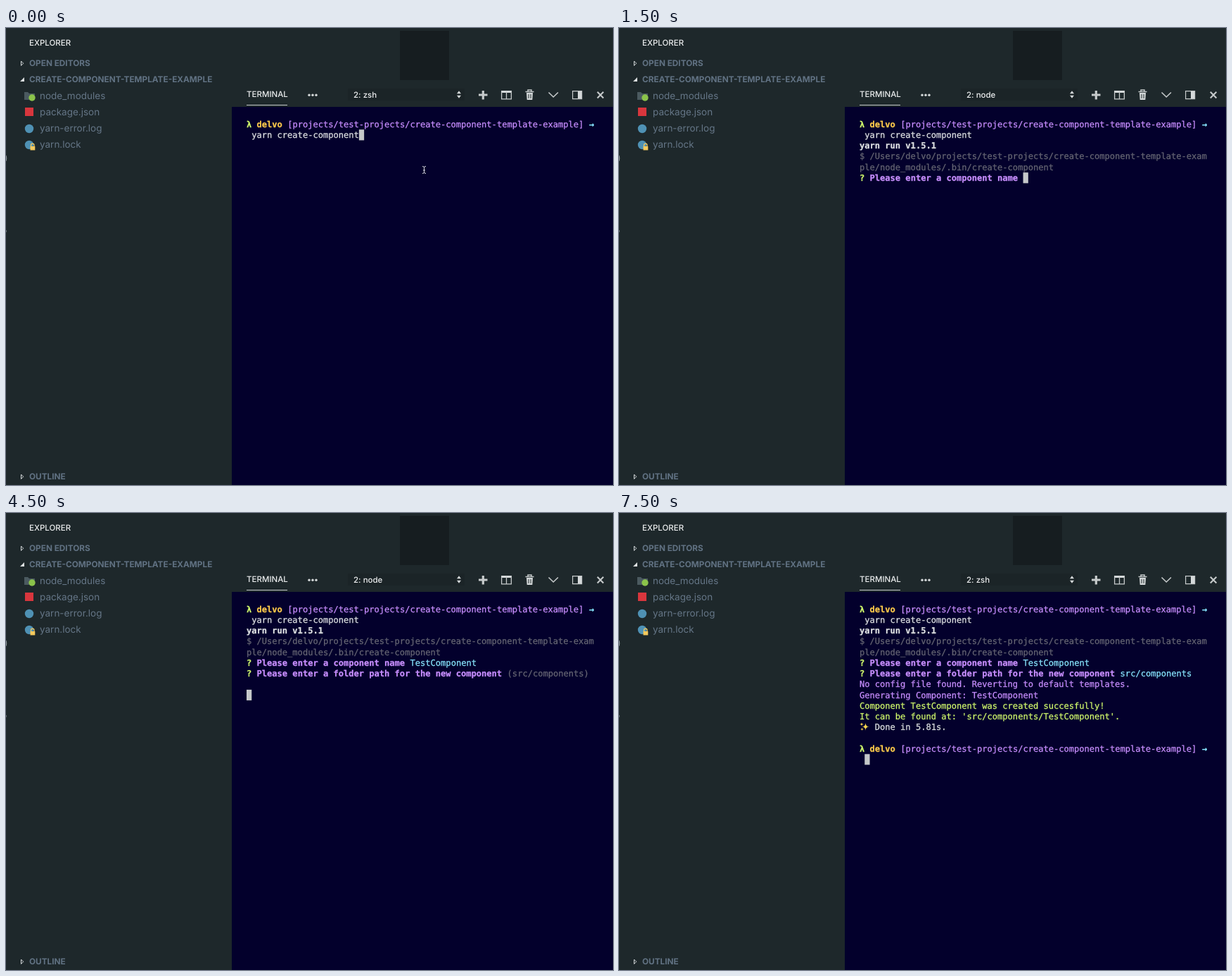
An HTML page for the animation above (8000 ms loop, 863 by 649 pixels).

```html
<!DOCTYPE html>
<html lang="en">
<head>
<meta charset="utf-8">
<title>Component generator in a terminal</title>
<style>
  html, body { margin: 0; width: 100%; height: 100%; overflow: hidden; background: #1e282b; }
  svg { display: block; width: 863px; height: 649px; text-rendering: geometricPrecision; }
  .ui { font-family: Inter, Roboto, sans-serif; font-size: 11.5px; }
  .head { font-size: 11.8px; font-weight: 700; fill: #617283; }
  .file { font-size: 13.5px; fill: #657687; }
  .lit { fill: #eceeef; font-weight: 500; }
  .icons { fill: none; stroke: #c6cacb; }
  #term text { font-family: "DejaVu Sans Mono", "Liberation Mono", monospace; font-size: 12.07px;
    white-space: pre; stroke-width: .25px; }
</style>
</head>
<body>
<svg viewBox="0 0 863 649">
  <rect width="863" height="649" fill="#1e282b"/>
  <rect x="321" y="112" width="542" height="537" fill="#03002c"/>
  <rect x="560" y="4" width="70" height="70" fill="#161d20"/>

  <g fill="none" stroke="#9aa3a8">
    <path d="M0 181q1.5 4 0 8M0 287v3"/>
    <path d="M21.5 47v6.4l3.2-3.2zM21.5 634v6.4l3.2-3.2z" stroke="#d5d9db"/>
  </g>
  <path d="M26 70v6h-6z" fill="#dde0e1"/>

  <g class="ui">
    <text class="lit" x="33" y="25">EXPLORER</text>
    <g class="head">
      <text x="33" y="53.5">OPEN EDITORS</text>
      <text x="33" y="77">CREATE-COMPONENT-TEMPLATE-EXAMPLE</text>
      <text x="33" y="641">OUTLINE</text>
    </g>
    <g class="file">
      <text x="48" y="101">node_modules</text>
      <text x="48" y="123.5">package.json</text>
      <text x="48" y="146.5">yarn-error.log</text>
      <text x="48" y="170">yarn.lock</text>
    </g>
    <text class="lit" x="342" y="98">TERMINAL</text>
    <rect x="486" y="86" width="166" height="17" fill="#1b2427"/>
    <text class="lit" id="shell" x="494" y="98.5"></text>
  </g>

  <path d="M26 91h5l2 2h8v9H26z" fill="#4b5a60"/>
  <circle cx="37" cy="99" r="4.7" fill="#8bc34a"/>
  <rect x="27" y="113" width="12" height="12" fill="#d8363d"/>
  <circle cx="33" cy="143" r="6.2" fill="#4f91b4"/>
  <circle cx="33" cy="166" r="6.2" fill="#4f91b4"/>
  <path d="M35.5 168v-1.5a2.3 2.3 0 0 1 4.6 0v1.5" fill="none" stroke="#f4c95d" stroke-width="1.2"/>
  <rect x="34.5" y="168" width="6.8" height="5.5" fill="#f4c95d"/>

  <path d="M342 109.5h58" stroke="#c2c7c9"/>
  <g fill="#d5d9da">
    <circle cx="431" cy="95.3" r="1.7"/><circle cx="436" cy="95.3" r="1.7"/><circle cx="441" cy="95.3" r="1.7"/>
    <path d="M641 93.2l3-4 3 4zM641 95.8l3 4 3-4z"/>
    <path d="M704 89h15v3h-15zM813 89h6v12h-6zM740 92h9l-.7 10h-7.6z"/>
  </g>
  <g class="icons">
    <path d="M672 95h12.5M678.3 89v12.5" stroke-width="3.2"/>
    <path d="M704.6 90v10.9h13.8V90M711.5 90v11" stroke-width="1.3"/>
    <path d="M738.5 90.5h12M742 90v-2h5v2" stroke-width="1.5"/>
    <path d="M771.5 91.5l6.7 6.5 6.7-6.5" stroke-width="1.6"/>
    <path d="M805.6 89.6h13v11h-13z" stroke-width="1.2"/>
    <path d="M840.8 90.8l8.6 8.6m0-8.6l-8.6 8.6" stroke-width="2.1"/>
  </g>
  <path d="M743 94v6m3-6v6" stroke="#1e282b"/>

  <g id="term"></g>
  <path id="pointer" d="M592 196.5q2.5 0 2.5 1.5v7q0 1.5-2.5 1.5M597 196.5q-2.5 0-2.5 1.5v7q0 1.5 2.5 1.5M593 202h3" fill="none" stroke="#d4d4dc"/>
</svg>
<script>
const LOOP = 8000, LEFT = 342, TOP = 129, COL = 7.267, ROW = 15.24;
const WHITE = '#dfe2e3', GRAY = '#666673', PURPLE = '#c98fff',
      GREEN = '#d2fa6c', YELLOW = '#ffcb4b', CYAN = '#89e8ff';
const term = document.getElementById('term');
const shell = document.getElementById('shell');
const pointer = document.getElementById('pointer');

// A span is [text, colour, bold]; a line is a list of spans.
const prompt = [['λ ', GREEN, 1], ['delvo ', YELLOW, 1],
  ['[projects/test-projects/create-component-template-example] ', PURPLE], ['→', CYAN, 1]];
const ask = (text, answer, colour) => [['? ', GREEN, 1], [text + ' ', PURPLE, 1], [answer, colour]];
const askName = (answer, colour) => ask('Please enter a component name', answer, colour);
const askPath = (answer, colour) => ask('Please enter a folder path for the new component', answer, colour);
const command = [prompt, [[' yarn create-component', WHITE]]];
const started = [
  ...command,
  [['yarn run v1.5.1', WHITE, 1]],
  [['$ /Users/delvo/projects/test-projects/create-component-template-exam', GRAY]],
  [['ple/node_modules/.bin/create-component', GRAY]]
];
const named = [...started, askName('TestComponent', CYAN)];
const result = [
  [['No config file found. Reverting to default templates.', PURPLE]],
  [['Generating Component: TestComponent', PURPLE]],
  [['Component TestComponent was created succesfully!', GREEN]],
  [["It can be found at: 'src/components/TestComponent'.", GREEN]],
  [['   Done in 5.81s.', WHITE]],
  [], prompt
];

// Typed length of the name at each half second from 1500 ms.
const typed = [0, 1, 4, 8, 9, 13];

function screen(t) {
  if (t < 500) return { lines: command, cursor: [1, 22] };
  if (t < 1000) return { lines: command, cursor: [2, 0] };
  if (t < 1500) return { lines: started, cursor: [5, 0] };
  if (t < 4500) {
    const n = typed[Math.floor((t - 1500) / 500)];
    return { lines: [...started, askName('TestComponent'.slice(0, n), WHITE)], cursor: [5, 32 + n] };
  }
  if (t < 7000) return { lines: [...named, askPath('(src/components)', GRAY)], cursor: [8, 0] };
  return { lines: [...named, askPath('src/components', CYAN), ...result], cursor: [14, 1], done: true };
}

function drawLine(spans, row) {
  let col = 0;
  return spans.map(([text, colour, bold]) => {
    const x = LEFT + col * COL;
    col += text.length;
    return `<text x="${x}" y="${TOP + row * ROW + 11.6}" fill="${colour}" stroke="${colour}" font-weight="${bold ? 700 : 400}">${text}</text>`;
  }).join('');
}

const star = (x, y, r) =>
  `<path fill="#ffd84d" d="M${x} ${y - r}Q${x} ${y} ${x + r} ${y}Q${x} ${y} ${x} ${y + r}Q${x} ${y} ${x - r} ${y}Q${x} ${y} ${x} ${y - r}"/>`;

let last = '';
function draw(t) {
  const { lines, cursor: [row, col], done } = screen(t);
  let html = lines.map(drawLine).join('');
  html += `<rect x="${LEFT + col * COL}" y="${TOP + row * ROW}" width="${COL}" height="15.2" fill="#c5c8c9"/>`;
  if (done) html += star(350.5, 303.5, 5.5) + star(345, 300, 3) + star(345.5, 307, 2.5);
  if (html !== last) term.innerHTML = last = html;
  shell.textContent = t >= 1000 && t < 7500 ? '2: node' : '2: zsh';
  pointer.style.display = t < 500 ? '' : 'none';
}

const start = performance.now();
function tick() {
  draw((performance.now() - start) % LOOP);
  requestAnimationFrame(tick);
}
tick();
</script>
</body>
</html>
```
